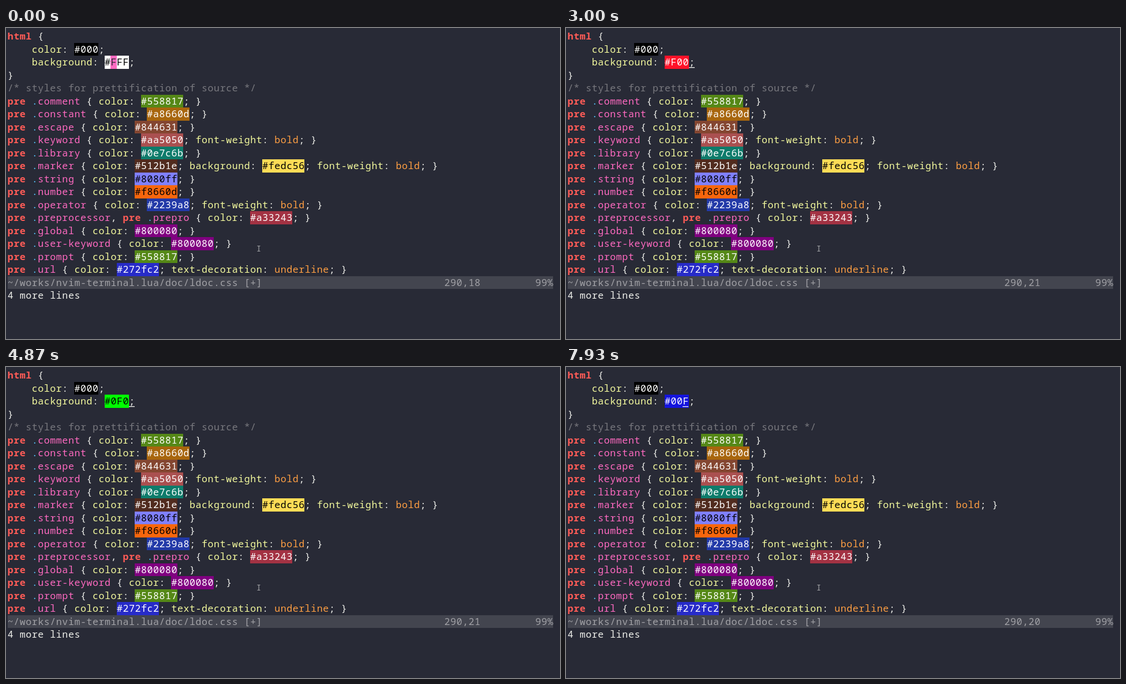
Write an HTML page with a canvas that moves like this. It is 960 by 540 pixels and loops after 8000 ms.

```html
<!DOCTYPE html>
<html lang="en">
<head>
<meta charset="utf-8">
<title>Terminal editor</title>
<style>
  html, body { margin: 0; width: 100%; height: 100%; overflow: hidden; background: #282a36; }
  canvas { display: block; }
</style>
</head>
<body>
<canvas width="960" height="540"></canvas>
<script>
const ctx = document.querySelector('canvas').getContext('2d');
const LOOP = 8000, LEFT = 2.5, TOP = 3, CELL = 10.51, ROW = 22.5, BASELINE = 17;
const FONT = '16.6px "Noto Sans Mono", monospace';
const THEME = {
  back: '#282a36', text: '#eff0eb', comment: '#78787e', tag: '#ff5c57', dot: '#57c7ff',
  name: '#ff6ac1', property: '#f3f99d', value: '#ff9f43', bar: '#43454f', barText: '#a1a1a6'
};

const rule = (name, hex, rest = '') => `pre .${name} { color: ${hex};${rest} }`;
const BOLD = ' font-weight: bold;';
const cssLines = value => [
  'html {',
  '    color: #000;',
  `    background: ${value};`,
  '}',
  '/* styles for prettification of source */',
  rule('comment', '#558817'),
  rule('constant', '#a8660d'),
  rule('escape', '#844631'),
  rule('keyword', '#aa5050', BOLD),
  rule('library', '#0e7c6b'),
  rule('marker', '#512b1e', ' background: #fedc56;' + BOLD),
  rule('string', '#8080ff'),
  rule('number', '#f8660d'),
  rule('operator', '#2239a8', BOLD),
  rule('preprocessor, pre .prepro', '#a33243'),
  rule('global', '#800080'),
  rule('user-keyword', '#800080'),
  rule('prompt', '#558817'),
  rule('url', '#272fc2', ' text-decoration: underline;')
];

// Keystrokes in replace mode: [time, key]; '<' is backspace.
const KEYS = [
  [1900, 'F'], [2200, '0'], [2450, '0'], [3350, '<'], [3550, '<'], [3750, '<'],
  [4130, '0'], [4420, 'F'], [4650, '0'], [5050, '<'], [5220, '<'], [5390, '<'],
  [5950, '0'], [6250, '0']
];
const REPLACE_SHOWN = 1240, REPLACE_MODE = 1340;

// Swatches that appear softer on screen than their pure colour.
const SHOWN = { '#F00': '#ff1229', '#00F': '#1414dd', '#272fc2': '#272bc8' };

const TOKENS = new RegExp([
  String.raw`(?<comment>/\*.*\*/)`,
  String.raw`(?<hex>#[\da-fA-F]+)`,
  String.raw`(?<tag>\b(?:html|pre)\b)`,
  String.raw`(?<dot>\.)`,
  String.raw`(?<name>(?<=\.)[\w-]+)`,
  String.raw`(?<property>[\w-]+(?=:))`,
  String.raw`(?<value>\b(?:bold|underline)\b)`,
  String.raw`(?<text>\S)`
].join('|'), 'g');

const colX = col => LEFT + col * CELL;
const rowY = row => TOP + row * ROW;

function fillCells(col, row, count, color) {
  const x = Math.round(colX(col)), y = Math.round(rowY(row));
  ctx.fillStyle = color;
  ctx.fillRect(x, y, Math.round(colX(col + count)) - x, Math.round(rowY(row + 1)) - y);
}

function print(col, row, text, color, bold = false) {
  ctx.font = (bold ? 'bold ' : '') + FONT;
  ctx.fillStyle = color;
  [...text].forEach((ch, i) => ctx.fillText(ch, colX(col + i + 0.5), rowY(row) + BASELINE));
}

function contrastText(hex) {
  const digits = hex.length === 4 ? hex.slice(1).replace(/./g, '$&$&') : hex.slice(1);
  const [r, g, b] = digits.match(/../g).map(d => parseInt(d, 16));
  return 0.299 * r + 0.587 * g + 0.114 * b > 127.5 ? '#000' : '#fff';
}

function printCss(line, row) {
  for (const match of line.matchAll(TOKENS)) {
    const text = match[0];
    const kind = Object.keys(match.groups).find(key => match.groups[key] !== undefined);
    if (kind === 'hex') {
      fillCells(match.index, row, text.length, SHOWN[text] || text);
      print(match.index, row, text, contrastText(text));
    } else {
      print(match.index, row, text, THEME[kind], kind === 'tag');
    }
  }
}

function editorState(time) {
  const digits = ['F', 'F', 'F'];
  let position = 0;
  for (const [at, key] of KEYS) {
    if (at > time) break;
    if (key === '<') digits[--position] = 'F';
    else digits[position++] = key;
  }
  return { digits, position };
}

function drawCursor(time, { digits, position }) {
  const col = 17 + position, row = 2;
  if (time < REPLACE_MODE) {
    fillCells(col, row, 1, THEME.name);
    print(col, row, digits[position], THEME.back);
  } else {
    ctx.fillStyle = THEME.text;
    ctx.fillRect(Math.round(colX(col)), rowY(row + 1) - 2.5, 10, 1.3);
  }
}

function drawPointer() {
  ctx.fillStyle = '#a4a5a8';
  ctx.fillRect(437.5, 378, 1.2, 10);
  for (const y of [378, 387]) ctx.fillRect(435.5, y, 5, 1);
}

function draw(time) {
  const state = editorState(time);
  ctx.fillStyle = THEME.back;
  ctx.fillRect(0, 0, 960, 540);
  ctx.textAlign = 'center';

  cssLines('#' + state.digits.join('')).forEach(printCss);
  drawCursor(time, state);

  fillCells(0, 19, 90, THEME.bar);
  print(0, 19, '~/works/nvim-terminal.lua/doc/ldoc.css [+]', THEME.barText);
  print(72, 19, '290,' + (18 + state.position), THEME.barText);
  print(87, 19, '99%', THEME.barText);
  print(0, 20, '4 more lines', THEME.text);
  if (time >= REPLACE_SHOWN && time < REPLACE_MODE) print(79, 22, 'R', THEME.text);
  drawPointer();
}

const start = performance.now();
function tick() {
  draw((performance.now() - start) % LOOP);
  requestAnimationFrame(tick);
}
tick();
</script>
</body>
</html>
```
